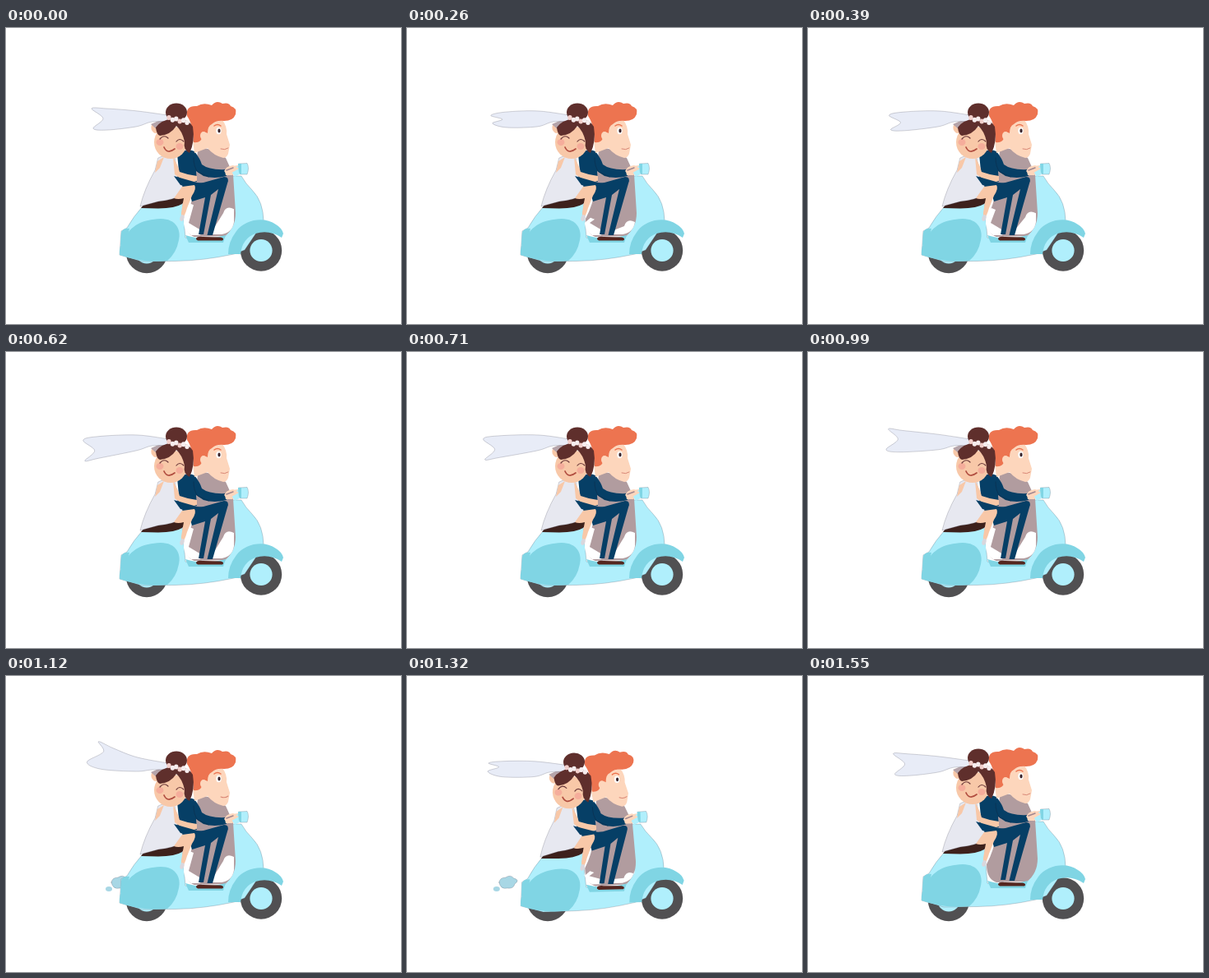
Write an HTML page with a canvas that moves like this. It is 480 by 360 pixels and loops after 1.65 s.

```html
<!DOCTYPE html>
<html lang="en">
<head>
<meta charset="utf-8">
<title>Scooter ride</title>
<style>
html, body { margin: 0; width: 100%; height: 100%; overflow: hidden; background: #fff; }
canvas { display: block; }
</style>
</head>
<body>
<canvas id="stage" width="480" height="360"></canvas>
<script>
const ctx = document.getElementById('stage').getContext('2d');
const LOOP = 1650;
const C = {
  light: '#b0effc', teal: '#80d5e4', tire: '#515052', navy: '#063f66',
  skin: '#fdd6bc', blush: '#f8c8a8', brown: '#5f2f2c', orange: '#ed7450',
  mauve: '#b19c9f', dress: '#e7e8f0', veil: '#e8ecf7', shoe: '#55261f',
  edge: 'rgba(80,80,95,.5)'
};

// Smooth pulse of height 1 around a moment.
const pulse = (t, at, width) => Math.exp(-(((t - at) / width) ** 2));
const mix = (a, b, u) => a + (b - a) * u;

// Three runs of evenly spaced steps with a short rest between them.
function stepTime(t) {
  const run = (from, to, count) => {
    const gap = (to - from) / (count - 1);
    return from + gap * Math.floor((Math.min(t, to) - from) / gap + .01);
  };
  if (t < 70) return 0;
  if (t < 620) return run(70, 550, 10);
  return t < 1190 ? run(620, 1120, 13) : run(1190, 1550, 7);
}

function fill(d, color, edge) {
  const p = new Path2D(d);
  ctx.fillStyle = color;
  ctx.fill(p);
  if (edge) {
    ctx.strokeStyle = C.edge;
    ctx.lineWidth = .5;
    ctx.stroke(p);
  }
}
function line(d, color, width) {
  ctx.strokeStyle = color;
  ctx.lineWidth = width;
  ctx.stroke(new Path2D(d));
}
function oval(x, y, rx, ry, color, angle = 0) {
  ctx.fillStyle = color;
  ctx.beginPath();
  ctx.ellipse(x, y, rx, ry, angle, 0, 7);
  ctx.fill();
}

// Open Catmull-Rom curve through [x, y] points.
function spline(points) {
  const at = i => points[Math.min(points.length - 1, Math.max(0, i))];
  let d = 'M' + at(0);
  for (let i = 0; i < points.length - 1; i++) {
    const [a, b, c, e] = [at(i - 1), at(i), at(i + 1), at(i + 2)];
    const p = b.map((x, j) => x + (c[j] - a[j]) / 6);
    const q = c.map((x, j) => x - (e[j] - b[j]) / 6);
    d += `C${p} ${q} ${c}`;
  }
  return d + 'Z';
}

// A forked ribbon: its end sinks, whips up, and closes twice per loop.
function veil(t) {
  const rise = pulse(t, 1120, 150);
  const x = 99 + 6 * Math.cos(2 * Math.PI * t / LOOP) + 9 * rise;
  const y = 110 + 10 * pulse(t, 600, 250) - 18 * rise;
  const spread = 12.5 - 8 * pulse(t, 260, 150) - 7.5 * pulse(t, 1320, 90);
  const lean = 8 * rise;
  const top = 101 - 2 * rise, bottom = 120 - 4 * rise;
  const upper = [x - 1 + lean, y - spread], lower = [x + 1 - lean, y + spread];
  fill(spline([
    [203, 107], [160, top],
    [upper[0] + 18, mix(upper[1], top, .5) - 1.5], upper,
    [x + 13, y], lower,
    [lower[0] + 17, mix(lower[1], bottom, .5) + 3], [158, bottom],
    [178, 114], [204, 114]
  ]), C.veil, true);
}

function wheel(x, y) {
  oval(x, y, 25.2, 25.2, C.tire);
  oval(x, y, 13.6, 13.6, C.light);
}

function scooter(gap) {
  fill('M166 217L214 210L218 255Q240 260 266 254Q279 240 277 212L274 180L286 180Q291 189 299 197Q313 211 313 236L290 270L277 275Q240 283 206 283.5L165 284L138 276L140 247L147 243Q155 229 166 217Z', C.light, true);
  fill('M233 148Q244 144 252 150L267 158L276 178L279 225Q279 243 266 253L229 254Q217 250 217 232Q226 215 229 195Z', C.mauve);
  if (gap > .05) {
    const left = 251 - 38 * gap, right = 250 - 34 * gap;
    fill(`M216 ${left + 6}L223 ${left}L228 ${left + 2}L222 ${Math.max(left + 6, 237)}L237 246L236 252H225Q217 247 216 238Z`, '#fff');
    fill(`M277 ${right + 4}Q267 ${right - 1} 264 ${right + 9}L251 246V251H262Q275 249 277 236Z`, '#fff');
  }
  fill('M218 252Q240 259 267 252L264 261H222Z', C.teal);
  fill('M139 264L140 249Q142 243 150 244L146 260Z', C.teal);
  fill('M138 276Q137 266 143 257C152 240 165 233 188 232C207 232 213 246 210 258Q207 274 196 283Q165 286 138 276Z', C.teal);
  fill('M270 275Q270 260 280 247C291 232 315 229 328 239Q335 243 337 250L335 255Q320 245 303 250Q287 256 285 275Z', C.teal);
  fill('M164 219L170 212L216 203Q219 209 214 214Q206 219 185 219.5Z', '#3d211c');
}

function groom() {
  fill('M205 178Q223 190 240 188L265 181Q272 181 269 189L251 252H244.5L258 196L249 203L240 251H234L242 206L226 211Q225 203 213 196Z', C.navy);
  fill('M231 257Q231 253 239 254L261 254.5Q266 256 263 258.5L233 258.5Z', C.shoe);
  fill('M208 153Q219 146 229 150Q236 159 238 166Q247 173 267 172L268 180Q253 184 240 180L231 174L232 187Q218 188 204 181L210 174Z', C.navy);
  line('M228 158Q228 169 233 175L246 181', '#0b3152', .8);
  fill('M266 174Q267 168 274 168L282 167L284 173L275 179L267 179Z', C.skin);
  fill('M238 119L263 112Q269 120 268 129L272 142L270 153Q268 158 264 158Q252 155 245 146L229 152L227 137Z', C.skin);
  fill('M228 139Q227 116 220 107Q218 94 232 95Q240 90 250 94Q256 87 263 92Q271 90 273 95Q281 97 279 105Q276 113 265 113Q256 112 250 117Q245 119 245 128Q238 124 238 133Q237 140 228 139Z', C.orange);
  oval(240, 131, 4, 5, C.skin);
  oval(258.5, 125, 3.2, 4.2, '#fff');
  oval(259, 125, 1.6, 2.4, '#39232a');
  line('M253 119Q257 116 261 119', C.orange, 1.5);
  line('M261 147Q266 149 270 146', '#d98876', 1);
}

function bride(t) {
  fill('M185 158Q193 153 205 157L209 177Q206 184 214 190L216 202Q204 209 185 211L163 217Q168 196 181 173Z', C.dress, true);
  fill('M184 162L192 157L187 170L181 176Z', C.blush);
  fill('M203 157Q209 167 211 175Q222 179 232 180L232 186L225 188Q213 185 205 178Z', C.blush);
  fill('M204 180L232 188L229 195L212 191Z', C.navy);
  fill('M214 193L229 191Q232 195 226 204L220 219Q217 230 213 233L213 224L216 207Q209 209 204 207Z', C.blush);
  oval(214, 231, 2.5, 4, '#d9d7dd', .3);

  oval(181, 122, 4.5, 6, C.blush, -.3);
  oval(200, 139, 20, 20, C.blush);
  fill('M176 117L190 111L202 112L184 124Z', '#b5a4aa');
  veil(t);
  oval(207, 102.5, 13, 11, C.brown);
  fill('M182 121Q188 112 203 110Q221 109 227 120Q230 138 223 152Q215 148 217 138Q214 125 207 119Q200 130 187 131Q183 130 182 121Z', C.brown);
  for (let i = 0; i < 6; i++) {
    oval(198 + 4.4 * i, 109 + (i % 2) * 2 + i * .8, 2.7, 3, i % 3 ? '#f7edee' : '#f2cfcb');
  }
  oval(187, 139, 4.5, 4, '#f5ad9b');
  oval(211, 144, 4.5, 4, '#f5ad9b');
  line('M187 135Q192 129 197 134M207 138Q211 133 216 138', '#6b393a', 1.2);
  line('M192 145Q196 154 205 147', '#b04c3f', 1.7);
}

function handlebar() {
  fill('M273 173L283 167L286 177L278 181Z', C.light);
  fill('M265 174Q268 168 276 167L283 171L276 175L270 179Z', C.skin);
  line('M268 173L276 170', '#9f8790', 1.5);
  fill('M283 165L293 164.5Q296 170 293 178L285 178Z', C.light, true);
  fill('M282 165L286 165L286 178L283 176Z', C.teal);
}

function puff(t) {
  if (t < 1120 || t >= 1420) return;
  ctx.save();
  ctx.translate(138 - 17 * (t - 1120) / 200, 252);
  fill('M-10 -1Q-9 -7 -2 -7Q4 -11 8 -6Q16 -4 9 1Q8 7 0 6Q-8 8 -10 -1Z', '#a8d7e5', true);
  oval(-13, 7, 4, 3, '#a8d7e5');
  ctx.restore();
}

function draw(t) {
  const dip = pulse(t, 1320, 80), hop = pulse(t, 1550, 90);
  const gap = Math.max(0, 1 - .5 * pulse(t, 260, 120) - .6 * dip - hop);
  ctx.fillStyle = '#fff';
  ctx.fillRect(0, 0, 480, 360);
  puff(t);
  wheel(171, 273);
  wheel(310, 270.5);
  ctx.save();
  ctx.translate(290, 265 - 3 * hop);
  ctx.rotate(-.025 * dip);
  ctx.translate(-290, -265);
  scooter(gap);
  groom();
  bride(t);
  handlebar();
  ctx.restore();
}

const start = performance.now();
function tick() {
  draw(stepTime((performance.now() - start) % LOOP));
  requestAnimationFrame(tick);
}
ctx.lineCap = ctx.lineJoin = 'round';
tick();
</script>
</body>
</html>
```
